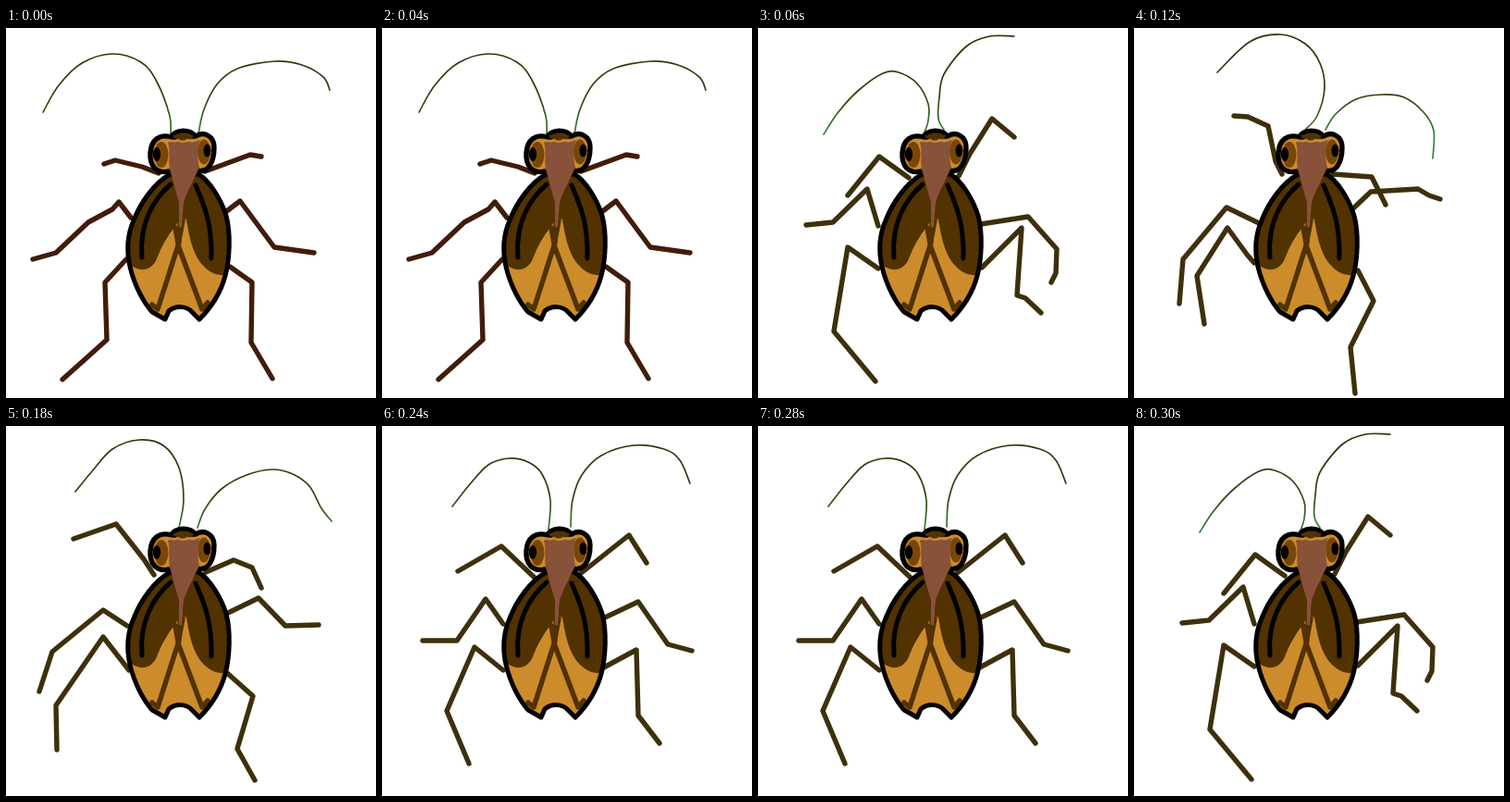
Recreate the animation shown at these times as an HTML page. Size 400 by 400 pixels, loop 360 ms.

```html
<!DOCTYPE html>
<html lang="en">
<head>
<meta charset="utf-8">
<title>Beetle</title>
<style>
html, body { margin: 0; width: 100%; height: 100%; overflow: hidden; background: #fff; }
svg { display: block; width: 100vw; height: 100vh; }
.line { fill: none; stroke-linecap: round; stroke-linejoin: round; }
</style>
</head>
<body>
<svg viewBox="0 0 400 400">
  <defs>
    <linearGradient id="feeler" gradientUnits="userSpaceOnUse" x1="0" y1="10" x2="0" y2="115">
      <stop offset="0" stop-color="#33300a"/>
      <stop offset=".6" stop-color="#35420f"/>
      <stop offset="1" stop-color="#37813a"/>
    </linearGradient>
    <path id="shell" d="M178 158C160 167 145 190 138 208C131 224 130 240 134 258C139 279 149 297 158 307L172 315L176 306C183 300 195 300 201 307L209 315C218 306 231 290 237 268C242 249 243 222 238 203C233 186 220 165 208 158Z"/>
    <clipPath id="inside"><use href="#shell"/></clipPath>
  </defs>

  <path id="legs" class="line" stroke-width="5.4"/>
  <path id="feelers" class="line" stroke="url(#feeler)" stroke-width="1.7"/>

  <g id="wings">
    <use href="#shell" fill="#cc8c2c"/>
    <g clip-path="url(#inside)">
      <path fill="#523200" d="M125 150H190L188 207C178 221 170 231 164 247C159 262 147 264 137 258L120 250Z"/>
      <path fill="#523200" d="M187 150H250V262L240 266C229 270 217 263 209 252C201 240 198 225 195 207L189 204Z"/>
      <path class="line" stroke="#523200" stroke-width="5.5" d="M190 180L187 232L164 304L158 299M191 208L186 235L212 304L218 297M183 216L187 238"/>
    </g>
    <use href="#shell" class="line" stroke="#000" stroke-width="5"/>
    <path class="line" stroke="#000" stroke-width="5" d="M178 169C158 186 144 213 147 248M205 170C215 193 223 213 222 249"/>
  </g>

  <g id="head">
    <path fill="#cc8c2c" stroke="#000" stroke-width="5.4" stroke-linejoin="round" d="M179 118C166 114 157 121 156 135C155 149 163 158 176 155L184 161H201L207 154C218 157 225 146 225 129C225 117 214 111 205 117Z"/>
    <path fill="#523200" stroke="#000" stroke-width="5" d="M178 119C181 109 201 108 205 118"/>
    <path fill="#523200" d="M180 116H203L201 120L190 122L183 119Z"/>
    <ellipse cx="168" cy="137" rx="7.5" ry="14" fill="#784707"/>
    <ellipse cx="214" cy="134" rx="7" ry="13.5" fill="#784707"/>
    <ellipse cx="163" cy="136.500" rx="4.200" ry="7.500"/>
    <ellipse cx="217.500" cy="132.500" rx="4" ry="7"/>
    <path fill="#87513a" d="M175 124C179 121 182 125 187 122C193 126 198 121 202 123L210 121C206 130 207 141 209 151C204 162 197 174 192 188L190 215H187L187 188C183 176 181 166 177 153C175 142 178 133 175 124Z"/>
    <path class="line" stroke="#cc8c2c" stroke-width="2.200" d="M176 121Q181 124 186 121Q191 125 196 121Q202 124 209 120"/>
  </g>
</svg>
<script>
const STEP = 60;
const brown = "#421c0a", olive = "#3d300b";

// Each limb runs from the body outwards.
const poses = [
  {
    color: brown,
    legs: ["165,157 147,150 118,143 106,147", "135,205 122,188 115,196 89,210 54,243 29,250", "130,250 107,275 109,337 61,380",
           "215,155 264,137 276,139", "236,200 253,187 290,237 333,243", "242,258 266,275 265,340 288,379"],
    feelers: ["178,114 177,95 163,58 146,37 115,28 82,38 57,62 40,91",
              "208,114 214,88 228,61 250,44 290,36 320,40 343,53 350,67"]
  },
  {
    color: olive,
    legs: ["163,162 131,139 97,181", "130,214 118,174 81,210 52,213", "130,260 97,237 82,328 127,382",
           "217,160 229,136 253,98 277,118", "241,212 292,204 323,239 322,265 317,275", "242,259 285,216 280,289 289,292 306,308"],
    feelers: ["180,113 184,100 184,82 172,60 152,48 135,49 108,68 86,92 71,115",
              "201,110 195,98 196,75 201,50 225,20 250,9 277,9"]
  },
  {
    color: olive,
    legs: ["160,158 153,144 145,106 123,96 108,95", "133,210 100,194 53,250 49,298", "130,254 123,246 101,216 68,268 76,320",
           "215,158 257,161 272,191", "236,196 256,177 307,174 319,181 331,185", "242,262 259,295 234,345 239,395"],
    feelers: ["185,110 198,95 206,65 201,38 185,17 158,7 125,15 90,48",
              "207,110 218,93 240,77 268,72 292,75 313,91 324,111 323,141"]
  },
  {
    color: olive,
    legs: ["160,161 149,144 119,106 73,122", "131,216 105,199 50,244 36,287", "133,264 105,228 54,302 55,350",
           "216,158 246,145 266,153 276,175", "238,203 273,186 302,216 338,215", "239,267 267,292 250,349 269,383"],
    feelers: ["187,110 192,80 187,45 170,21 144,15 115,25 93,49 75,71",
              "207,110 215,90 233,68 260,53 288,47 310,52 328,65 341,89 352,103"]
  },
  {
    color: olive,
    legs: ["165,164 129,130 82,157", "131,214 112,187 81,232 44,232", "131,264 100,239 70,308 94,365",
           "214,160 267,118 286,148", "241,207 277,190 309,236 335,243", "238,262 275,242 277,313 300,343"],
    feelers: ["180,112 182,80 173,52 158,39 137,35 115,42 95,63 76,87",
              "204,109 206,80 216,53 237,32 271,21 305,25 322,37 333,62"]
  }
];
const cycle = [0, 1, 2, 3, 4, 1];

// Smooth curve through all points (Catmull-Rom as Bezier).
function smooth(text) {
  const pts = text.split(" ").map(p => p.split(",").map(Number));
  const at = i => pts[Math.max(0, Math.min(pts.length - 1, i))];
  const handle = (i, dir) => at(i).map((v, k) => v + dir * (at(i + 1)[k] - at(i - 1)[k]) / 6);
  let d = "M" + pts[0];
  for (let i = 1; i < pts.length; i++) d += `C${handle(i - 1, 1)} ${handle(i, -1)} ${pts[i]}`;
  return d;
}

const legs = document.getElementById("legs");
const feelers = document.getElementById("feelers");
let shown = -1;

function draw(time) {
  const i = cycle[Math.floor(time / STEP) % cycle.length];
  if (i === shown) return;
  shown = i;
  const pose = poses[i];
  legs.setAttribute("d", pose.legs.map(p => "M" + p).join(""));
  legs.setAttribute("stroke", pose.color);
  feelers.setAttribute("d", pose.feelers.map(smooth).join(""));
}

const start = performance.now();
function tick() {
  draw(performance.now() - start);
  requestAnimationFrame(tick);
}
tick();
</script>
</body>
</html>
```
